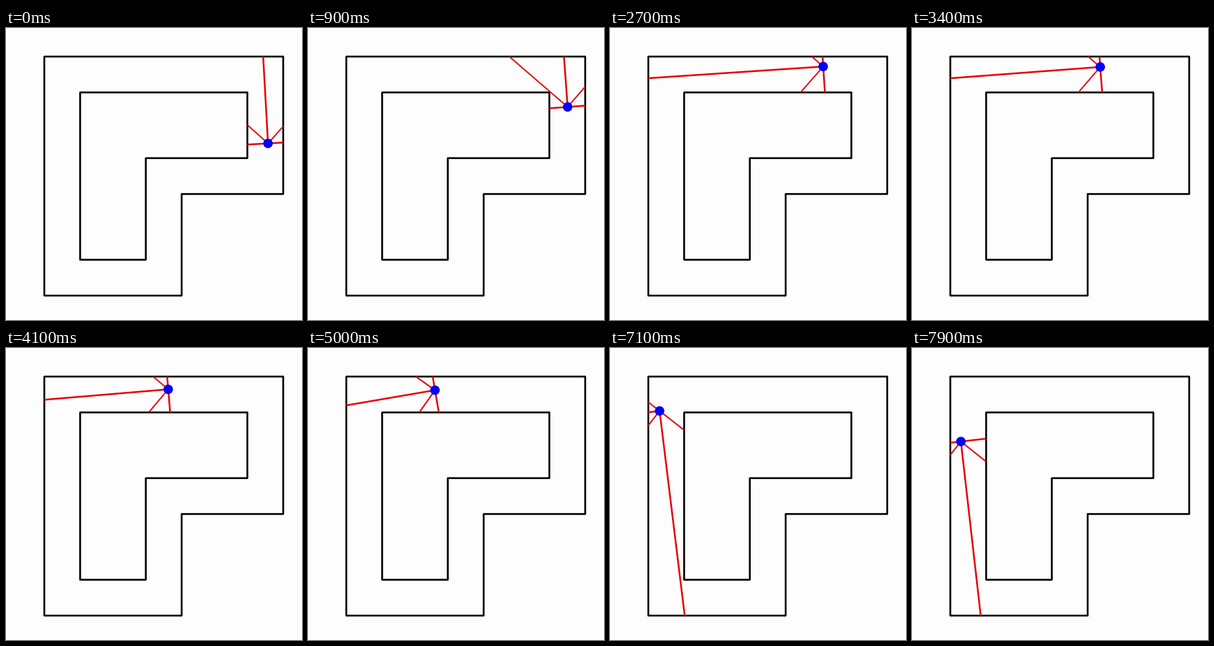
Recreate the animation shown at these times as a matplotlib script. Size 425 px wide and 419 px high, loop 8 s.

```python
import numpy as np
import matplotlib.pyplot as plt
from matplotlib.animation import FuncAnimation
from matplotlib.patches import Circle, Polygon

W, H, DPI = 425, 419, 64
PX = 72 / DPI
FRAMES, STEP_MS = 80, 100

LEFT, TOP, SIDE, ARM, LANE = 55, 41, 343, 197.2, 51.45
REACH = 40  # beyond this the left sensor flips to the rear diagonal
SENSORS = (0, 45, -45, -90, 90)

# car positions where its course changes: step, x, y
KEYS = np.array([
    (0, 376.2, 165.6), (9, 372.8, 113.3), (13, 368.5, 87.6), (17, 353.7, 66.4),
    (27, 306.1, 55.3), (41, 232.9, 59.3), (59, 131.7, 63.8), (63, 110.2, 67.2),
    (67, 87.7, 74.4), (71, 71.2, 90.3), (79, 70.2, 134.2)])

# steering: step, heading in degrees counter-clockwise from east
STEER = np.array([(0, 93.2), (9, 94.2), (18.2, 183.2), (41, 184.8),
                  (59, 194.65), (63, 197), (71, 277), (79, 276.5)])


def ell(inset):
    """L-shaped wall, moved inwards by the given amount."""
    x0, y0 = LEFT + inset, TOP + inset
    x1, y1 = LEFT + SIDE - inset, TOP + SIDE - inset
    xm, ym = LEFT + ARM - inset, TOP + ARM - inset
    return np.array([(x0, y0), (x1, y0), (x1, ym), (xm, ym), (xm, y1), (x0, y1)])


TRACK = [ell(0), ell(LANE)]
WALLS = [(p, q) for poly in TRACK for p, q in zip(poly, np.roll(poly, -1, axis=0))]

STEPS, SPOTS = KEYS[:, 0], KEYS[:, 1:]
SPEEDS = np.gradient(SPOTS, STEPS, axis=0)


def locate(n):
    """Cubic Hermite curve through the key positions."""
    i = min(np.searchsorted(STEPS, n, side="right") - 1, len(STEPS) - 2)
    h = STEPS[i + 1] - STEPS[i]
    u = (n - STEPS[i]) / h
    v = 1 - u
    return (v * v * ((1 + 2 * u) * SPOTS[i] + u * h * SPEEDS[i])
            + u * u * ((1 + 2 * v) * SPOTS[i + 1] - v * h * SPEEDS[i + 1]))


def cast(pos, deg):
    """Distance to the nearest wall and the point hit."""
    a = np.radians(deg)
    dx, dy = np.cos(a), -np.sin(a)
    best = 1e3
    for p, q in WALLS:
        ex, ey = q - p
        det = dx * ey - dy * ex
        if abs(det) < 1e-9:
            continue
        rx, ry = p - pos
        t = (rx * ey - ry * ex) / det
        s = (rx * dy - ry * dx) / det
        if t > 0 and 0 <= s <= 1:
            best = min(best, t)
    return best, pos + best * np.array([dx, dy])


fig = plt.figure(figsize=(W / DPI, H / DPI), dpi=DPI, facecolor="#fefdfe")
ax = fig.add_axes([0, 0, 1, 1])
ax.set_xlim(0, W)
ax.set_ylim(H, 0)
ax.axis("off")

for poly in TRACK:
    ax.add_patch(Polygon(poly, fill=False, ec="black", lw=2.6 * PX,
                         joinstyle="round", snap=False))

rays = [ax.plot([], [], color="#e60005", solid_capstyle="butt", snap=False, zorder=3)[0]
        for _ in SENSORS]
car = ax.add_patch(Circle((0, 0), 6.8, fc="#0000fa", ec="none", zorder=4))


def update(n):
    pos = locate(n)
    heading = np.interp(n, *STEER.T)
    car.center = pos
    for ray, offset in zip(rays, SENSORS):
        deg = heading + offset
        dist, end = cast(pos, deg)
        if offset == 90 and dist > REACH:
            deg = heading - 135
            dist, end = cast(pos, deg)
        a = np.radians(deg)
        ray.set_data([pos[0], end[0]], [pos[1], end[1]])
        ray.set_linewidth(2.5 * PX * max(abs(np.cos(a)), abs(np.sin(a))))
    return [*rays, car]


anim = FuncAnimation(fig, update, frames=FRAMES, interval=STEP_MS,
                     repeat=True, repeat_delay=0, blit=False)
plt.show()
```
